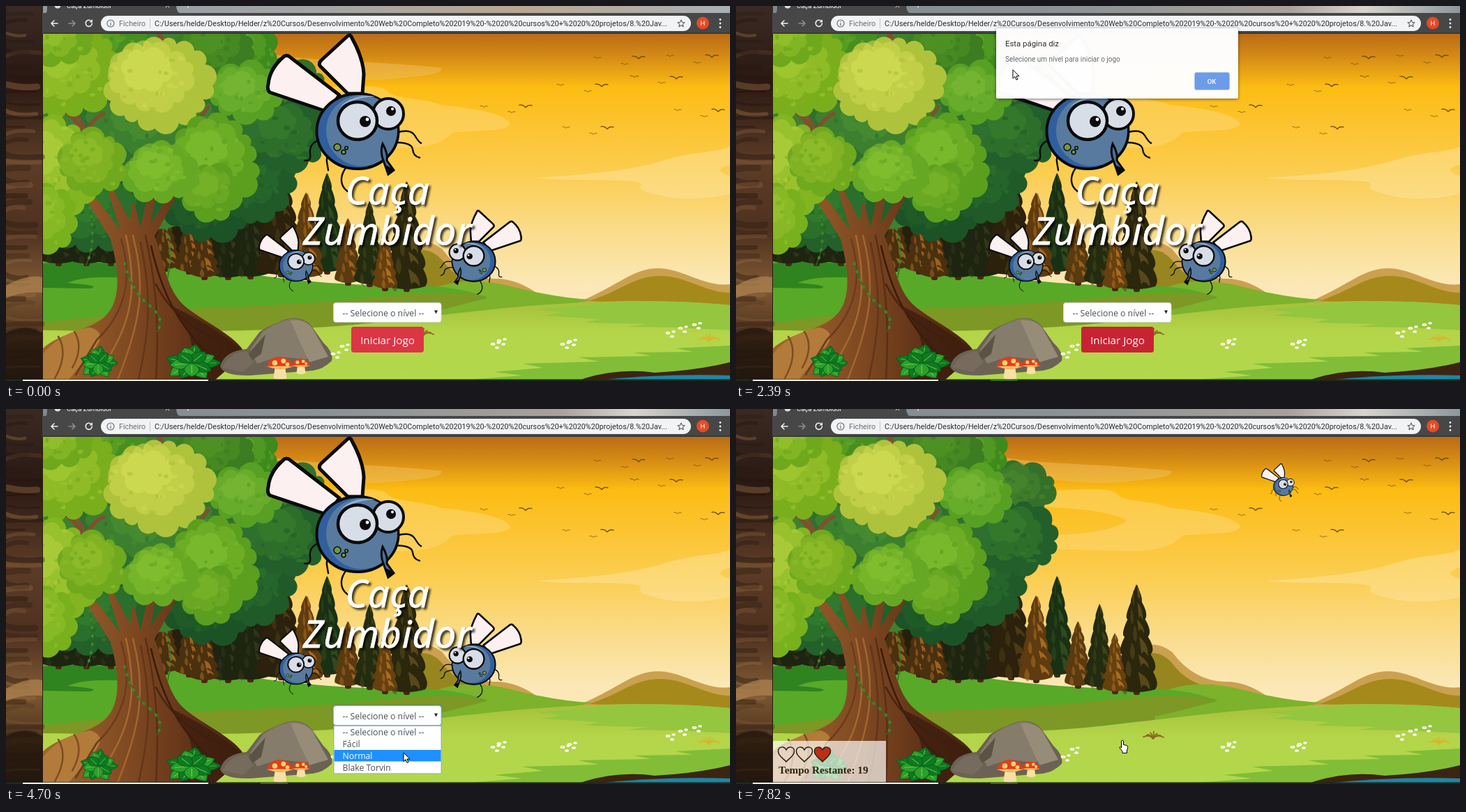
Recreate the animation shown at these times as an HTML page. Size 1038 by 539 pixels, loop 8 s.

```html
<!DOCTYPE html>
<html lang="pt">
<head>
<meta charset="utf-8">
<title>Caça Zumbidor</title>
<style>
html, body { margin: 0; width: 100%; height: 100%; overflow: hidden; background: #2c1c14; }
svg { display: block; width: 100vw; height: 100vh; }
text { white-space: pre; }
.ui { font-family: "Open Sans", sans-serif; font-size: 12.26px; fill: #495057; }
.bar { font-family: Roboto, sans-serif; font-size: 10.74px; fill: #2c2d30; }
.title { font: italic 54px "Open Sans", sans-serif; letter-spacing: 1px; fill: #fff; stroke: #fff; text-anchor: middle; filter: drop-shadow(3px 3px 1.5px #000b); }
.time { font: bold 15.2px "Liberation Serif", serif; fill: #2b2310; }
.mid { text-anchor: middle; }
</style>
</head>
<body>
<script>
let seed = 11;
const rnd = (a = 0, b = 1) => (seed = seed * 16807 % 2147483647, a + (b - a) * seed / 2147483647);
const shape = (d, fill, more = '') => `<path d="${d}" fill="${fill}" ${more}/>`;
const line = (d, color, w, more = '') => shape(d, 'none', `stroke="${color}" stroke-width="${w}" stroke-linecap="round" stroke-linejoin="round" ${more}`);
const dot = (x, y, rx, fill, ry = rx, more = '') => `<ellipse cx="${x}" cy="${y}" rx="${rx}" ry="${ry}" fill="${fill}" ${more}/>`;
const rect = (x, y, w, h, fill, more = '') => `<rect x="${x}" y="${y}" width="${w}" height="${h}" fill="${fill}" ${more}/>`;
const text = (x, y, cls, str, more = '') => `<text x="${x}" y="${y}" class="${cls}" ${more}>${str}</text>`;
const grad = (id, stops, dir = 'x2="0" y2="1"') => `<linearGradient id="${id}" ${dir}>` +
  stops.map(([o, c]) => `<stop offset="${o}" stop-color="${c}"/>`).join('') + '</linearGradient>';
const each = (list, fn) => list.map(a => fn(...a)).join('');

// Closed outline of uneven round lobes
function lobes(cx, cy, rx, ry) {
  const n = Math.max(7, Math.round((rx + ry) / 9)), pts = [];
  for (let i = 0; i < n; i++) {
    const a = (i + rnd(-.25, .25)) / n * 2 * Math.PI, k = rnd(.84, 1.02);
    pts.push([cx + rx * k * Math.cos(a), cy + ry * k * Math.sin(a)]);
  }
  return 'M' + pts[0] + pts.map((q, i) => {
    const p = pts[(i + 1) % n], r = Math.hypot(p[0] - q[0], p[1] - q[1]) * .54;
    return `A${r} ${r} 0 0 1 ${p}`;
  }).join('');
}

// Clump of leaves: shaded base, lit upper left, speckles
function puff(cx, cy, rx, ry, base, lit) {
  let out = shape(lobes(cx, cy, rx, ry), base) +
    shape(lobes(cx - rx * .14, cy - ry * .16, rx * .76, ry * .74), lit, 'opacity=".6"') +
    shape(lobes(cx - rx * .2, cy - ry * .3, rx * .45, ry * .4), lit);
  for (let i = 0; i < (rx + ry) / 5; i++) {
    const a = rnd(0, 6.28), k = rnd(.2, .9);
    out += dot(cx + rx * k * Math.cos(a), cy + ry * k * Math.sin(a), rnd(1.5, 5), i % 2 ? lit : base, rnd(2, 4), 'opacity=".7"');
  }
  return out;
}

function pine(x, top, bottom, w, base, lit) {
  const n = 6, h = (bottom - top) / n;
  const half = i => w * .54 * (i / n) ** .7;
  let right = '', left = '', marks = '';
  for (let i = 1; i <= n; i++) {
    const y = top + h * i, r = half(i), k = rnd(.9, 1.15);
    right += `Q${x + r * 1.15 * k} ${y - h * .3} ${x + r * .9} ${y}`;
    left = `Q${x - r * 1.15 * k} ${y - h * .1} ${x - half(i - 1) * .9} ${y - h}` + left;
    marks += shape(`M${x + r * rnd(0, .3)} ${y - h}q${r * .6} ${h * .4} ${r * .55} ${h * rnd(.7, 1.2)}q${-r * .3} ${-h * .5} ${-r * .4} ${-h * .1}z`, lit) +
      shape(`M${x - r * rnd(.1, .6)} ${y - h * .7}q${r * .3} ${h * .5} ${r * .1} ${h}q${-r * .4} ${-h * .2} ${-r * .1} ${-h}z`, lit, 'opacity=".6"');
  }
  return rect(x - 4, bottom - 4, 9, 12, '#4a2410', 'rx="3"') +
    shape(`M${x} ${top}${right}Q${x} ${bottom + 8} ${x - w * .48} ${bottom}${left}Z`, base) + marks;
}

const bird = (x, y, s) => line(`M${x - s} ${y - s * .3}q${s * .6} ${-s * .1} ${s} ${s * .4}q${s * .4} ${-s * .5} ${s} ${-s * .3}`, '#6b4812', s / 7);
const flower = (x, y) => dot(x, y, 3.4, '#fff', 2.1) + dot(x + 8, y - 2, 2.8, '#fff', 1.8) + dot(x + 6, y + 5, 3, '#fff', 1.8) + dot(x, y, 1, '#e9d36a');
const tuft = (x, y, c) => [-14, -9, -4, 1, 6, 11, 15].map(k => line(`M${x} ${y + 6}q${k * .4} -7 ${k} ${-11 + Math.abs(k) * .6}`, c, 1.8)).join('');

function bush(x, y, sx, sy) {
  let out = '';
  for (let i = 0; i < 13; i++) {
    const a = i * 139 % 360, l = 29 - i * .8;
    out += `<g transform="rotate(${a})">` + shape(`M0 0Q${l * .5} -15 ${l} 0Q${l * .5} 15 0 0`, i % 2 ? '#2aa02a' : '#0d7a22', 'stroke="#0a5a1a" stroke-width=".8"') +
      line(`M4 0H${l - 5}`, '#8fd24a', .7) + '</g>';
  }
  return `<g transform="translate(${x} ${y}) scale(${sx} ${sy})">${out}</g>`;
}

const mushroom = (x, y, r) => shape(`M${x - r * .35} ${y}L${x - r * .5} ${y + r * 1.05}Q${x} ${y + r * 1.3} ${x + r * .5} ${y + r * 1.05}L${x + r * .35} ${y}Z`, '#f6e0a4') +
  shape(`M${x - r} ${y + 3}Q${x - r * .8} ${y - r * .6} ${x} ${y - r * .55}T${x + r} ${y + 3}Q${x} ${y + r * .55} ${x - r} ${y + 3}`, '#e23c1c') +
  shape(`M${x - r} ${y + 3}Q${x} ${y + r * .55} ${x + r} ${y + 3}Q${x} ${y + r * .1} ${x - r} ${y + 3}`, '#f2c268') +
  dot(x - r * .4, y - 2, r * .2, '#fbd26a') + dot(x + r * .25, y - r * .25, r * .18, '#fbd26a') + dot(x + r * .55, y, r * .15, '#fbd26a');

// Rock wall: soft gradient with uneven strata
const strata = () => Array.from({ length: 44 }, (_, i) => {
  const y = i * 12.4, s = rnd(-12, 12);
  return line(`M-4 ${y}Q${rnd(5, 25)} ${y + s} ${rnd(25, 52)} ${y + s * .6}`, i % 3 ? '#1a0f0a' : '#a87a4c', rnd(3, 9), `opacity="${rnd(.12, .4)}"`);
}).join('');
const desktop = rect(0, 0, 53, 539, 'url(#rock)') + strata() +
  shape('M0 402Q30 385 52 390V412Q20 410 0 420Z', '#b08550', 'opacity=".7"') +
  shape('M0 470Q28 455 52 470V539H0Z', '#20140c', 'opacity=".7"') + rect(52, 40, 1, 499, '#2a1a10');

const land =
  rect(53, 40, 985, 400, 'url(#sky)') +
  shape('M375 68C430 80 520 78 624 89C628 99 590 101 550 105C500 110 430 98 375 92Z', '#f0c060', 'opacity=".5"') +
  shape('M390 118C470 120 540 108 548 124C560 134 600 132 622 142C680 148 718 156 723 170C715 182 670 178 640 182Q620 206 560 204L400 200V178C470 186 545 176 560 160C530 142 440 140 390 140Z', '#fdd97a', 'opacity=".5"') +
  shape('M760 247C840 242 900 236 950 220C990 208 1015 212 1038 202V228Q1010 236 1038 244V270C1000 280 950 278 930 270C890 262 925 256 900 252C850 248 800 252 760 247Z', '#fde9ae', 'opacity=".4"') +
  each([[848, 75, 5], [907, 75, 9], [952, 72, 5], [1012, 73, 9], [887, 84, 5], [991, 82, 5], [901, 102, 6], [961, 104, 9], [795, 114, 5], [854, 115, 9], [940, 111, 5],
    [834, 123, 5], [685, 145, 5], [745, 145, 9], [725, 153, 5], [963, 150, 5], [1021, 151, 9], [1001, 159, 5], [803, 175, 5], [862, 176, 9], [842, 184, 5]], bird) +
  rect(53, 432, 985, 107, '#7d9824') +
  shape('M575 345Q600 330 625 349Q655 390 700 392Q740 390 785 432H560Z', '#cba14f') +
  shape('M580 356Q605 342 625 365Q650 400 700 403Q730 408 740 432H560Z', '#97861f') +
  shape('M825 424C880 400 900 377 935 377S1000 404 1038 400V432H825Z', '#cba14f') +
  shape('M836 424C885 408 900 388 938 388S1005 413 1038 412V432Z', '#a58a1b') +
  shape('M600 412Q650 385 720 402Q790 420 840 422L780 437 600 460Z', '#7cb22c') +
  shape('M53 366Q200 360 330 382T600 402Q660 405 690 420L520 460 53 480Z', '#58a927') +
  shape('M53 370Q110 364 175 374L160 390Q110 388 88 398Q140 402 120 406L53 405Z', '#2f8420') +
  shape('M240 436Q420 430 520 420Q640 405 690 418Q600 448 480 460Q330 475 53 470V455Q180 440 240 436Z', '#7d9824') +
  shape('M53 466C300 470 420 466 520 456C680 438 760 426 900 424Q980 424 1038 430V539H53Z', 'url(#meadow)') +
  shape('M1038 430Q960 422 880 426L760 436 800 440 770 445 850 450 830 455 920 457 890 461 960 462 1038 466Z', '#94c640') +
  shape('M1038 488L960 492 985 497 900 498 925 503 820 505 850 511 740 514 770 520 700 526 740 531 640 539H1038Z', '#82bd38') +
  shape('M830 535Q880 520 930 527Q990 524 1038 512V539H820Z', '#3b2512') +
  shape('M850 538Q940 528 1038 531V539H850Z', '#1f86a5') +
  shape('M53 280H390L400 378Q200 372 53 364Z', '#261f0d') +
  each([[75, 290, 366, 50], [115, 290, 366, 50], [150, 290, 366, 44], [318, 285, 386, 50], [350, 280, 385, 52]], (x, a, b, w) => pine(x, a, b, w, '#1d2410', '#33341a')) +
  each([[228, 300, 374, 42], [262, 300, 378, 34], [284, 310, 386, 38]], (x, a, b, w) => pine(x, a, b, w, '#4a300f', '#9a6220')) +
  pine(394, 240, 382, 66, '#2b210c', '#4b3a14') + pine(460, 240, 378, 48, '#1a3014', '#2f4a1c') + pine(430, 268, 386, 46, '#5e3b10', '#a5691e') +
  pine(490, 305, 394, 36, '#5a3a10', '#9a6320') + pine(521, 280, 396, 38, '#232c10', '#424218') + pine(574, 252, 403, 56, '#2a270d', '#57481a') + pine(543, 322, 402, 32, '#66400f', '#a86d20');

const tree =
  shape('M53 40H340Q390 130 430 180Q410 260 340 290L230 320 53 330Z', '#3f8030') +
  each([[130, 296, 100, 50, '#23602a', '#2f7a2c'], [290, 285, 66, 48, '#1b5326', '#246228'], [355, 250, 60, 58, '#1f5a28', '#2a6c2c'], [405, 115, 50, 34, '#35702a', '#45832c'],
    [400, 185, 62, 50, '#235f2a', '#34782c'], [230, 175, 135, 56, '#2f7030', '#458a30'], [345, 64, 44, 38, '#3f8a1c', '#5aa226'], [300, 60, 54, 40, '#3b7d20', '#4d9024'], [130, 45, 70, 34, '#478f20', '#62a626']],
    puff) +
  each([['M112 200Q110 165 82 150', 7], ['M113 185Q125 160 140 155', 6], ['M112 175L100 150', 4], ['M262 195Q268 165 252 145', 7], ['M266 172Q282 158 290 145', 5], ['M222 75Q228 58 220 40', 8]],
    (d, w) => line(d, '#80502f', w)) +
  shape('M117 282L130 277 164 322 146 265 153 262 178 310 180 284 184 284 193 318 208 250 219 250 207 314 236 268 244 274 213 331C225 360 228 395 246 420C262 445 330 470 343 500L300 537H53V492C80 468 118 468 142 446C166 424 162 380 150 335Z', 'url(#bark)') +
  shape('M53 500Q80 468 120 462Q150 470 120 500L90 537H53Z', '#b27b3a') +
  each([['M165 335C182 390 172 440 130 480L100 530', '#6a3c1b'], ['M182 330C200 400 195 450 160 537', '#a0662e'], ['M200 330C215 400 220 450 215 537', '#5a2f16'], ['M172 330C185 390 186 440 150 500', '#a5692f'],
    ['M208 345C225 420 250 460 290 500', '#3a1b0d'], ['M193 340C210 420 205 470 190 537', '#63351a'], ['M215 400C235 440 270 470 330 490', '#4a2411'], ['M75 475Q90 500 70 535', '#7e4d22'], ['M98 468Q112 490 95 520', '#7e4d22']],
    (d, c) => line(d, c, 2.5)) +
  shape('M235 430Q300 460 343 500L300 537H250Q290 490 235 430Z', '#3b1c0e', 'opacity=".75"') +
  each([[85, 92, 80, 64, '#7aae1c', '#9cc52e'], [72, 50, 52, 30, '#6fa81c', '#90be2a'], [345, 125, 56, 38, '#58a024', '#74b432'],
    [218, 112, 78, 66, '#afc23c', '#cdd851'], [300, 224, 62, 62, '#5c9f1f', '#78b82c'], [292, 268, 44, 38, '#5c9f1f', '#74b028'], [222, 240, 52, 42, '#66a824', '#80bd2e'],
    [68, 232, 66, 72, '#82b521', '#a8ca38'], [125, 225, 48, 46, '#70a91e', '#8cba28'], [60, 305, 38, 48, '#78b01e', '#92c02c']],
    puff) +
  each([['M120 290Q130 340 115 372'], ['M230 320Q240 345 232 390'], ['M170 370Q180 410 205 430T216 468']], d => line(d, '#2d6a22', 1.4) + line(d, '#3d8428', 4, 'stroke-dasharray="1 11"'));

const props =
  shape('M307 518Q313 496 345 493L364 468Q380 458 390 455Q420 440 438 460L455 484Q470 498 467 510Q455 522 440 524L350 531Q312 532 307 518Z', '#6b6255') +
  shape('M350 494L368 468Q382 458 392 455Q420 441 438 462L450 490 430 508 390 504 360 514Z', '#857c6c') +
  shape('M408 452Q430 450 440 464L462 504 435 512 420 480Z', '#968c78') +
  shape('M350 497L372 472 366 500 340 518Z', '#5c5347') +
  shape('M310 520Q320 498 345 496L355 512 340 526Z', '#766b5c') +
  mushroom(393, 515, 19) + mushroom(423, 514, 13) +
  each([[482, 489], [469, 500], [698, 486], [707, 481], [798, 486], [808, 482], [949, 470], [967, 463], [987, 458]], flower) +
  tuft(598, 468, '#8f6a22') + tuft(1008, 476, '#d9b62c') + bush(132, 513, 1, .9) + bush(266, 513, 1.45, .98);

const ink = '#0b0b0b';
const fly = `<g id="fly"><g transform="translate(-373 -40)">` +
  each([['M447 193Q434 200 436 212T428 222'], ['M475 210Q458 212 460 224T462 236'], ['M500 220Q482 234 481 248T494 269'], ['M560 182Q580 176 586 186T595 197'], ['M557 196Q582 196 583 206T593 218']], d => line(d, ink, 2.4)) +
  each([['M399 72Q404 70 408 74L478 128 461 152 378 124Q374 120 376 112Q378 90 399 72Z'], ['M490 43Q494 40 496 46Q512 75 513 98L511 126H490L450 86Q448 82 452 78Z']],
    d => shape(d, '#fdf0f0', `stroke="${ink}" stroke-width="5" stroke-linejoin="round"`)) +
  dot(504, 180, 58.5, '#2f5f9f', 54, `stroke="${ink}" stroke-width="4"`) + dot(510, 179, 51, '#587a9f', 51) +
  shape('M478 145Q500 125 530 130Q505 130 478 145Z', '#8fb0d0') +
  shape('M540 198Q548 212 546 222L556 236 548 242 541 222Q536 210 540 198Z', '#46709e', `stroke="${ink}" stroke-width="3"`) +
  shape('M545 229L557 235 547 243Z', ink) +
  dot(548, 155, 22, '#d8dee8', 22, `stroke="${ink}" stroke-width="4"`) + dot(552, 151, 7, ink) + dot(554, 148, 2, '#fff') +
  dot(504, 165, 28, '#d8dee8', 27, `stroke="${ink}" stroke-width="4.5"`) + dot(515, 166, 8, ink) + dot(518, 163, 2.4, '#fff') +
  each([[475, 203, 5], [484, 210, 3], [488, 204, 2.2]], (x, y, r) => dot(x, y, r, '#6f9c3c', r, `stroke="${ink}" stroke-width="1.5"`)) + '</g></g>';
const useFly = (x, y, sx, sy = sx) => `<use href="#fly" transform="translate(${x} ${y}) scale(${sx} ${sy})"/>`;

const path = 'C:/Users/helde/Desktop/Helder/z%20Cursos/Desenvolvimento%20Web%20Completo%202019%20-%2020%20cursos%20+%2020%20projetos/8.%20Jav...';
const browser =
  rect(53, 0, 985, 12, 'url(#air1)', 'id="air"') + shape('M52 40V10H57Q59 10 59 0H244Q245 10 250 10H1038V40Z', '#474747') +
  text(87, 3, 'bar', 'Caça Zumbidor', 'style="fill:#fff;font-size:9.5px"') + dot(74, -1, 4.5, '#ddd') +
  line('M229 -3l5 5m0-5l-5 5', '#ddd', 1) + line('M258 -1h6m-3-3v6', '#eee', 1.2) +
  rect(53, 38.5, 985, 1.5, '#333') + rect(136, 14, 846, 22, '#f1f3f4', 'rx="11"') +
  line('M74 25H65m4-4l-4 4 4 4', '#f1f1f1', 1.6) + line('M90 25h9m-4-4l4 4-4 4', '#8f8f8f', 1.6) +
  line('M122 21.5a4.6 4.6 0 1 0 1.4 3.5', '#f1f1f1', 1.6) + shape('M124 19v4.5h-4.5z', '#f1f1f1') +
  line('M150 24.5v3.2m0-5.4v.1M145 25a5 5 0 1 0 10 0a5 5 0 1 0-10 0', '#5f6368', 1.1) +
  text(162, 29, 'bar', 'Ficheiro', 'style="fill:#6b6f73"') + rect(206, 18, 1, 14, '#c4c7ca') + text(213, 29, 'bar', path) +
  line('M968 20l1.5 3.4 3.6.3-2.8 2.4.9 3.6-3.2-2-3.2 2 .9-3.6-2.8-2.4 3.6-.3z', '#5f6368', 1.1) +
  dot(999, 24.5, 9, '#e64a25') + text(999, 28, 'bar mid', 'H', 'style="fill:#fff;font-size:9.5px"') +
  [19.5, 25, 30.5].map(y => dot(1024, y, 1.4, '#f1f1f1')).join('');

const bottom = rect(0, 536.5, 1038, 3, '#1c2b1c') + rect(24, 537, 266, 2, '#eee') + rect(365, 537, 39, 2, '#2f6a2a', 'id="task"');

const levels = ['-- Selecione o nível --', 'Fácil', 'Normal', 'Blake Torvin'];
const home = '<g id="home">' + useFly(373, 40, 1) + useFly(362, 316, .41) + useFly(740, 293, -.53, .53) +
  text(547, 285, 'title', 'Caça') + text(547, 343, 'title', 'Zumbidor') +
  rect(468.5, 424.5, 157, 32, '#007bff', 'rx="5" opacity=".25" id="focus"') +
  rect(469.5, 426.5, 154.5, 28, '#fff', 'rx="3.5" stroke="#ced4da" id="select"') + text(482.5, 445.5, 'ui', '', 'id="value"') +
  shape('M614 437.5h5l-2.500 5z', '#222') +
  rect(492, 458, 110, 43, '#dc3545', 'rx="6" opacity=".5" id="ring"') +
  rect(495, 461, 104, 37, '#dc3545', 'rx="4"') + rect(495, 461, 104, 37, '#c82333', 'rx="4" id="hover"') +
  text(547, 486, 'ui mid', 'Iniciar Jogo', 'style="fill:#fff;font-size:15.2px"') +
  '<g id="list">' + rect(470, 455.500, 154, 68.500, '#fff', 'stroke="#8fa9c0"') + rect(470.5, 456, 153, 16.5, '#1e90ff', 'id="mark"') +
  levels.map((s, i) => text(482.5, 468.5 + 17 * i, 'ui option', s)).join('') + '</g></g>';

const dialog = '<g id="dialog">' + rect(373, 32, 347, 101, '#fff', 'rx="2" style="filter:drop-shadow(0 1px 2px #0008)"') +
  text(386, 58, 'bar', 'Esta página diz', 'style="font-size:11.4px"') +
  text(386, 80, 'bar', 'Selecione um nível para iniciar o jogo', 'style="fill:#666a6e;font-size:10.03px"') +
  rect(657.5, 95.5, 50, 25, '#6a9cee', 'rx="2.5" stroke="#a8c7f5"') + text(682, 111.5, 'bar mid', 'OK', 'style="fill:#fff;font-size:9.5px;font-weight:500"') + '</g>';

const heart = x => shape(`M${x} 507C${x - 4} 502 ${x - 11.5} 499 ${x - 11.5} 492C${x - 11.5} 485 ${x - 3} 484 ${x} 490C${x + 3} 484 ${x + 11.5} 485 ${x + 11.5} 492C${x + 11.5} 499 ${x + 4} 502 ${x} 507Z`, '#bb3014', 'class="heart" stroke="#2e2013" stroke-width="1.5"');
const game = '<g id="game">' + rect(53, 477, 162, 59.5, '#fff', 'opacity=".68"') + [72, 98, 124].map(heart).join('') +
  text(61, 524, 'time', '', 'id="clock"') + '<use href="#fly" id="target"/></g>';

const cursor = '<g id="cursor" stroke="#000" stroke-width="1" stroke-linejoin="round" fill="#fff">' +
  '<path id="arrow" d="M0 0V12.500l2.900-2.700 2.100 4.700 2-.9-2.100-4.500h4z"/>' +
  '<path id="hand" d="M3.500 2Q5 0 6.500 2V7.500L11 8.500Q13 9 12.700 11.500L11.500 16V19.500H5V17L.8 11.800Q1 9.500 3.500 12Z"/></g>';

document.body.innerHTML = '<svg viewBox="0 0 1038 539" preserveAspectRatio="none"><defs>' +
  grad('sky', [[0, '#b96c16'], [.08, '#d58a15'], [.19, '#fcbc12'], [.3, '#fcc22a'], [.5, '#fbcd50'], [.7, '#fadb88'], [.9, '#fbe8b6']]) +
  grad('meadow', [[0, '#a5c03a'], [.4, '#b4d54a'], [1, '#b2d84c']]) +
  grad('bark', [[0, '#a0662c'], [.3, '#8a5226'], [.6, '#6f3d1c'], [1, '#43200f']], '') +
  grad('rock', [[0, '#3a2a22'], [.2, '#2a1913'], [.42, '#5c3c26'], [.6, '#4f3120'], [.75, '#805a34'], [.85, '#5a3c22'], [1, '#2a1b10']]) +
  grad('air1', [[0, '#8f9ba3'], [.4, '#a3a5a5'], [.7, '#bba792'], [1, '#a9b0b5']], '') +
  grad('air2', [[0, '#7d8a92'], [.45, '#8d9396'], [.75, '#a9a199'], [.86, '#d8d4cc'], [1, '#8d979d']], '') +
  fly + '</defs>' + land + tree + props + desktop + browser + home + game + dialog + bottom + cursor + '</svg>';

const el = id => document.getElementById(id);
const show = (id, on) => el(id).style.display = on ? '' : 'none';
const ramp = (t, a, b) => Math.min(1, Math.max(0, (t - a) / (b - a)));
const within = (t, a, b) => t >= a && t < b;

const route = [[420, 873, 333], [900, 520, 450], [980, 504, 463], [1070, 504, 463], [1220, 515, 482], [1300, 517, 479], [1930, 517, 479], [2150, 450, 270], [2400, 395, 85],
  [2690, 658, 107], [2770, 717, 106], [3000, 717, 106], [3200, 688, 116], [3380, 688, 116], [3540, 571, 446], [3700, 571, 446], [3770, 573, 444], [4230, 573, 444],
  [4460, 571, 480], [4630, 571, 480], [4700, 570, 494], [4950, 570, 494], [5330, 549, 475], [8000, 549, 475]];
const flights = [[6340, 7040, 953, 329, .172], [7040, 7820, 922, 372, .24], [7820, 8000, 753, 78, .24]];

function draw(t) {
  const playing = t >= 5560, focused = t >= 3920;
  show('home', !playing);
  show('game', playing);

  el('air').setAttribute('fill', t < 1470 ? 'url(#air1)' : 'url(#air2)');
  show('task', t >= 1470);

  const shown = ramp(t, 1440, 1640) * (1 - ramp(t, 3400, 3540));
  show('dialog', shown > 0);
  el('dialog').style.opacity = shown * .98;
  el('dialog').setAttribute('transform', `translate(0 ${-8 * (1 - ramp(t, 1440, 1645))})`);

  show('ring', within(t, 3420, 3920));
  el('hover').style.opacity = t < 3500 ? ramp(t, 1060, 1210) * (1 - ramp(t, 3400, 3500)) : ramp(t, 5220, 5370);
  show('focus', focused);
  el('select').setAttribute('stroke', focused ? '#80bdff' : '#ced4da');
  el('value').textContent = levels[t < 4950 ? 0 : 2];
  show('list', within(t, 3920, 4950));
  const pick = t < 4350 ? 0 : t < 4660 ? 1 : 2;
  el('mark').setAttribute('y', 456 + 17 * pick);
  document.querySelectorAll('.option').forEach((o, i) => o.style.fill = i === pick ? '#fff' : '');

  const lost = (t >= 7040) + (t >= 7820);
  document.querySelectorAll('.heart').forEach((h, i) => h.setAttribute('fill', i < lost ? 'none' : '#bb3014'));
  el('clock').textContent = 'Tempo Restante: ' + (t < 6580 ? '' : t < 7500 ? 20 : 19);
  const f = flights.find(([a, b]) => within(t, a, b));
  show('target', f);
  if (f) el('target').setAttribute('transform', `translate(${f[2]} ${f[3]}) scale(${f[4]})`);

  show('cursor', t >= 420);
  const i = Math.max(1, route.findIndex(p => p[0] > t));
  const [t0, x0, y0] = route[i - 1], [t1, x1, y1] = route[i], k = ramp(t, t0, t1);
  el('cursor').setAttribute('transform', `translate(${x0 + (x1 - x0) * k} ${y0 + (y1 - y0) * k})`);
  const hand = within(t, 940, 1930) || t >= 5220;
  show('hand', hand);
  show('arrow', !hand);
}

const start = performance.now();
function tick() {
  draw((performance.now() - start) % 8000);
  requestAnimationFrame(tick);
}
tick();
</script>
</body>
</html>
```
